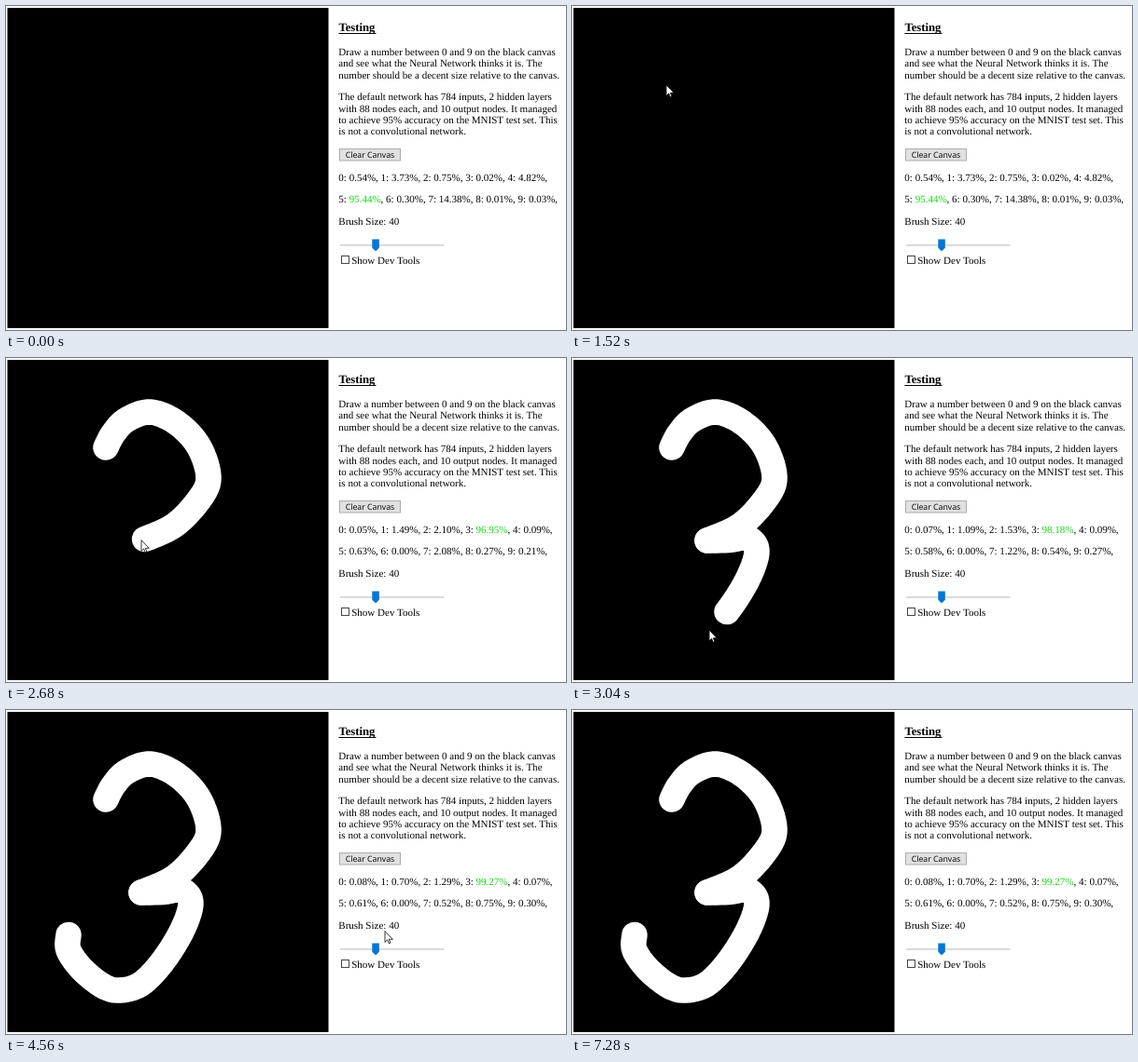
Recreate the animation shown at these times as an HTML page with a canvas. Size 600 by 348 pixels, loop 7.36 s.

```html
<!DOCTYPE html>
<html lang="en">
<head>
<meta charset="utf-8">
<title>Testing</title>
<style>
  html, body { margin: 0; width: 100%; height: 100%; overflow: hidden; background: #fff; }
  svg, canvas { position: absolute; left: 0; top: 0; width: 600px; height: 348px; }
  text { font: 11.03px "Liberation Serif", "Times New Roman", serif; text-rendering: geometricPrecision; white-space: pre; }
  .title { font-size: 12.7px; font-weight: bold; }
  .button { font: 8.75px "Open Sans", "Noto Sans", sans-serif; }
  .best { fill: #14d614; }
</style>
</head>
<body>
<svg viewBox="0 0 600 348">
  <rect x="1.5" y="2" width="344" height="344"/>
  <text class="title" x="356.4" y="27">Testing</text>
  <rect x="356.4" y="29" width="40" height="1"/>
  <g id="copy"></g>
  <rect x="357.5" y="153.5" width="65" height="12.5" fill="#e1e1e1" stroke="#adadad"/>
  <text class="button" x="390" y="163" text-anchor="middle">Clear Canvas</text>
  <text id="low" x="356.3" y="188"></text>
  <text id="high" x="356.3" y="211.4"></text>
  <text x="356.3" y="234.7">Brush Size: 40</text>
  <rect x="358" y="255.8" width="111.5" height="2.2" fill="#dcdcdc"/>
  <path d="M392.3 250.4h7.5v9.4l-3.75 3.7l-3.75 -3.7z" fill="#0078d7"/>
  <rect x="359.5" y="268.5" width="8" height="8" fill="#fff" stroke="#333" stroke-width=".9"/>
  <text x="370.2" y="277">Show Dev Tools</text>
</svg>
<canvas id="pad" width="600" height="348"></canvas>
<script>
const LOOP = 7360, STEP = 40, LAG = 50, BRUSH = 27.5;
const $ = id => document.getElementById(id);
const clamp = v => Math.min(1, Math.max(0, v));
const points = text => text.split(' ').map(p => p.split(',').map(Number));

const paragraphs = [
  [52.8, 'Draw a number between 0 and 9 on the black canvas',
    'and see what the Neural Network thinks it is. The',
    'number should be a decent size relative to the canvas.'],
  [101.2, 'The default network has 784 inputs, 2 hidden layers',
    'with 88 nodes each, and 10 output nodes. It managed',
    'to achieve 95% accuracy on the MNIST test set. This',
    'is not a convolutional network.']
];
$('copy').innerHTML = paragraphs.map(([y, ...lines]) =>
  lines.map((line, i) => `<text x="356.3" y="${y + i * 12.4}">${line}</text>`).join('')
).join('');

// Each leg of the pointer runs along a smooth curve through a few points
const leg = (from, to, power, path) => ({ from, to, power, path: points(path) });
const upper = leg(1920, 2640, 1.25,
  '107,96 115,81 129,66.5 154,58 182,69 206,94 217,128 207,152 180,180 145,196');
const lower = leg(2680, 3350, 1,
  '145,196 168,195.5 188,193.5 198,207 189,236 168,270 145,294 123,301 105,297 82,279 67,258 67,241.5');
const legs = [
  leg(840, 1520, 1, '32,349 25,300 75,130 101,85'),
  leg(1560, 1760, 1, '101,85 107,96'),
  upper, lower,
  leg(3480, 4560, 1, '67,242 250,250 406,238'),
  leg(4760, 5440, 1.5, '406,238 440,270 515,349')
];

// Catmull-Rom curve through all points, k from 0 to 1
function curve(path, k) {
  const last = path.length - 1;
  const i = Math.min(last - 1, Math.floor(k * last)), u = k * last - i;
  const at = n => path[Math.min(last, Math.max(0, n))];
  const [a, b, c, d] = [i - 1, i, i + 1, i + 2].map(at);
  return [0, 1].map(n => b[n] + u / 2 * (c[n] - a[n]
    + u * (2 * a[n] - 5 * b[n] + 4 * c[n] - d[n]
    + u * (3 * (b[n] - c[n]) + d[n] - a[n]))));
}

const along = ({ from, to, power, path }, t) =>
  curve(path, clamp((t - from) / (to - from)) ** power);

// Readings for digits 0 to 9, in percent, and when they are reached
const readings = [
  [1920, '.54 3.73 .75 .02 4.82 95.44 .30 14.38 .01 .03'],
  [2280, '.06 .11 95.92 3.91 .03 35.71 .15 .31 .24 .01'],
  [2680, '.05 1.49 2.10 96.95 .09 .63 0 2.08 .27 .21'],
  [3360, '.09 .74 1.03 99.27 .09 .54 0 .45 .78 .32'],
  [3440, '.08 .70 1.29 99.27 .07 .61 0 .52 .75 .30']
].map(([time, text]) => ({ time, values: text.split(' ').map(Number) }));

function showReadings(t) {
  const next = Math.max(1, readings.findIndex(r => r.time > t));
  const done = t >= readings[readings.length - 1].time;
  const b = readings[done ? readings.length - 1 : next];
  const a = readings[readings.indexOf(b) - 1];
  const k = clamp((t - a.time) / (b.time - a.time));
  const values = a.values.map((v, i) => v + (b.values[i] - v) * k);
  const best = values.indexOf(Math.max(...values));
  const cells = values.map((v, i) =>
    `${i}: <tspan${i === best ? ' class="best"' : ''}>${v.toFixed(2)}%</tspan>,`);
  $('low').innerHTML = cells.slice(0, 5).join(' ');
  $('high').innerHTML = cells.slice(5).join(' ');
}

const ctx = $('pad').getContext('2d');
const arrow = new Path2D('M0 0V11.4L2.6 8.9L4.3 12.8L6 12.1L4.3 8.3H8z');

function drawStroke(t) {
  ctx.lineWidth = BRUSH;
  ctx.lineCap = ctx.lineJoin = 'round';
  ctx.strokeStyle = '#fff';
  for (const part of [upper, lower]) {
    const end = Math.min(t - LAG, part.to);
    if (end <= part.from) continue;
    ctx.beginPath();
    for (let s = part.from; s < end; s += 10) ctx.lineTo(...along(part, s));
    ctx.lineTo(...along(part, end));
    ctx.stroke();
  }
}

function drawPointer(t) {
  const current = legs.filter(l => l.from <= t).pop();
  if (!current || t > legs[legs.length - 1].to) return;
  ctx.save();
  ctx.translate(...along(current, t));
  ctx.fillStyle = '#fff';
  ctx.strokeStyle = '#000';
  ctx.lineWidth = .8;
  ctx.lineJoin = 'miter';
  ctx.fill(arrow);
  ctx.stroke(arrow);
  ctx.restore();
}

let shown = -1;
const start = performance.now();
function frame() {
  const t = Math.floor((performance.now() - start) % LOOP / STEP) * STEP;
  if (t !== shown) {
    shown = t;
    showReadings(t);
    ctx.clearRect(0, 0, 600, 348);
    drawStroke(t);
    drawPointer(t);
  }
  requestAnimationFrame(frame);
}
frame();
</script>
</body>
</html>
```
